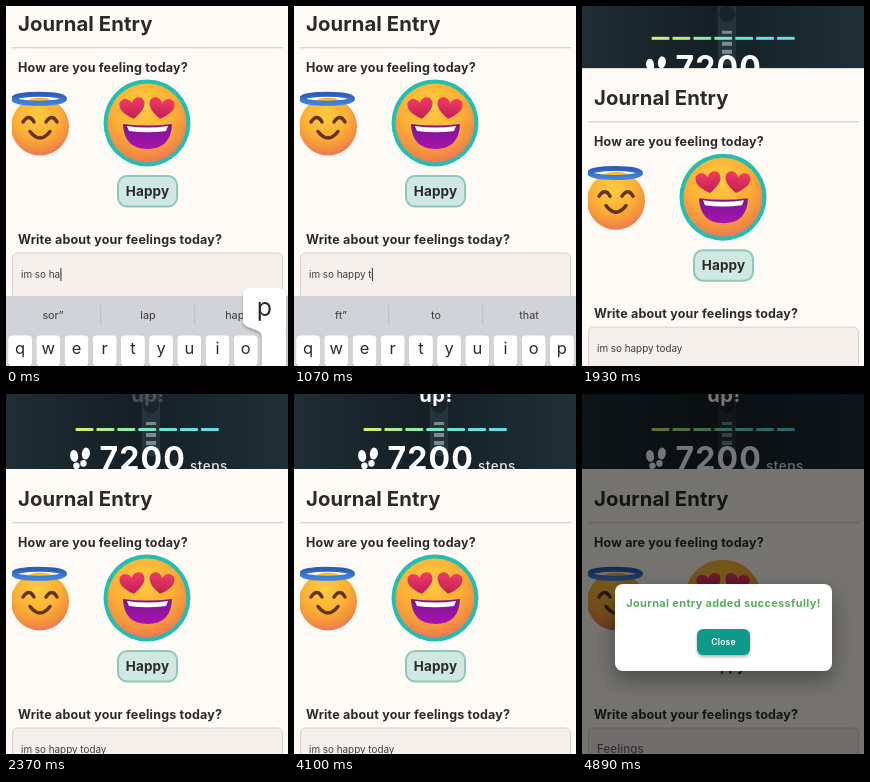
Write an HTML page that moves like this. It is 282x360 px and loops after 4960 ms.

```html
<!DOCTYPE html>
<html lang="en">
<head>
<meta charset="utf-8">
<title>Journal entry</title>
<style>
  html, body { margin: 0; width: 100%; height: 100%; overflow: hidden; background: #fefbf6; }
  svg { display: block; width: 282px; height: 360px; font-family: Inter, sans-serif; fill: #2b2a2b; }
  text { white-space: pre; }
  .mid { text-anchor: middle; }
  .head { font-weight: 700; font-size: 12.5px; letter-spacing: .18px; }
  #page, #hero, #keyboard, #cheer, #shade, #dialog { animation: 4960ms linear infinite; }
  #page { animation-name: scroll; }
  #hero { animation-name: parallax; }
  #keyboard { animation-name: slide; }
  #cheer { animation-name: cheer; }
  #shade, #dialog { animation-name: appear; }

  /* 1730 to 2160 ms */
  @keyframes scroll {
    0%, 34.88% { transform: translateY(0); animation-timing-function: cubic-bezier(.215, .61, .355, 1); }
    43.55%, 100% { transform: translateY(87px); }
  }
  @keyframes parallax {
    0%, 34.88% { transform: translateY(-22px); animation-timing-function: cubic-bezier(.215, .61, .355, 1); }
    43.55%, 100% { transform: translateY(0); }
  }
  /* 1730 to 1910 ms */
  @keyframes slide {
    0%, 34.88% { transform: translateY(0); animation-timing-function: ease; }
    38.51%, 100% { transform: translateY(110px); }
  }
  @keyframes cheer {
    0%, 40% { opacity: 0; }
    62% { opacity: .6; }
    82%, 100% { opacity: 1; }
  }
  /* 4560 to 4760 ms */
  @keyframes appear {
    0%, 91.94% { opacity: 0; animation-timing-function: ease-out; }
    95.97%, 100% { opacity: 1; }
  }

  #love { transform-origin: 141px 117px; }
  .sent #love { transform: scale(.97); }
  .sent .picked, #hint { display: none; }
  .sent #hint { display: inline; }
</style>
</head>
<body>
<svg id="stage" viewBox="0 0 282 360">
  <defs>
    <linearGradient id="night">
      <stop offset="0" stop-color="#1f2d34"/>
      <stop offset=".45" stop-color="#152026"/>
      <stop offset=".6" stop-color="#17242b"/>
      <stop offset="1" stop-color="#1f2f37"/>
    </linearGradient>
    <linearGradient id="progress" gradientUnits="userSpaceOnUse" x1="69" x2="213">
      <stop offset="0" stop-color="#e2ee62"/>
      <stop offset=".35" stop-color="#90eda4"/>
      <stop offset=".6" stop-color="#66e6d2"/>
      <stop offset="1" stop-color="#64daf0"/>
    </linearGradient>
    <radialGradient id="skin" cx=".45" cy=".3" r=".72">
      <stop offset="0" stop-color="#ffcc40"/>
      <stop offset=".55" stop-color="#fbaf35"/>
      <stop offset=".85" stop-color="#f28c42"/>
      <stop offset="1" stop-color="#ea7360"/>
    </radialGradient>
    <linearGradient id="rose" x2="0" y2="1">
      <stop offset="0" stop-color="#ee3d62"/>
      <stop offset="1" stop-color="#c41c5a"/>
    </linearGradient>
    <linearGradient id="plum" x2="0" y2="1">
      <stop offset="0" stop-color="#7a1590"/>
      <stop offset="1" stop-color="#a814b0"/>
    </linearGradient>
    <linearGradient id="halo" x2="0" y2="1">
      <stop offset="0" stop-color="#2a5fb8"/>
      <stop offset="1" stop-color="#3f82dc"/>
    </linearGradient>
    <clipPath id="edge"><rect x="6" y="70" width="270" height="100"/></clipPath>
    <path id="heart" d="M0 11C-8 6-13 1-12.500-4.500C-12-11-3-12 0-5C3-12 12-11 12.500-4.500C13 1 8 6 0 11Z"/>
    <filter id="soft" x="-30%" y="-30%" width="160%" height="180%">
      <feDropShadow dx="0" dy="2" stdDeviation="1.500" flood-opacity=".3"/>
    </filter>
    <filter id="lift" x="-20%" y="-40%" width="140%" height="210%">
      <feDropShadow dx="0" dy="9" stdDeviation="10" flood-opacity=".35"/>
    </filter>
  </defs>

  <g id="hero">
    <rect y="-30" width="282" height="140" fill="url(#night)"/>
    <rect x="136" y="-20" width="18" height="82" rx="4" fill="#25333a"/>
    <circle cx="145" cy="11" r="8" fill="#18242a"/>
    <path d="M140 28h10v3h-10zM140 39h10v4h-10zM140 47h10v4h-10z" fill="#7d8b90"/>
    <text id="cheer" class="mid" x="142" y="7.500" font-size="20" font-weight="700" letter-spacing=".5" fill="#fff">up!</text>
    <g id="dashes" fill="url(#progress)"></g>
    <g fill="#fff">
      <g transform="rotate(-8 68 65)">
        <ellipse cx="68.500" cy="62" rx="4" ry="6"/><ellipse cx="69.500" cy="72" rx="3.200" ry="3.300"/>
      </g>
      <g transform="rotate(8 79 62)">
        <ellipse cx="79.500" cy="59.500" rx="4" ry="6"/><ellipse cx="78.500" cy="69.500" rx="3.200" ry="3.300"/>
      </g>
      <text x="93.500" y="76" font-size="32" font-weight="700" letter-spacing="1.100">7200</text>
      <text x="184" y="76.500" font-size="13.500" font-weight="500" letter-spacing=".5" fill="#e4e7e8">steps</text>
    </g>
  </g>

  <g id="page">
    <rect y="-12" width="282" height="380" fill="#fefbf6"/>
    <text x="12" y="25" font-size="20.300" font-weight="700" letter-spacing=".1">Journal Entry</text>
    <rect x="6" y="41" width="271" height="1.300" fill="#d6d3d1"/>
    <text class="head" x="12" y="66">How are you feeling today?</text>

    <g id="angel" clip-path="url(#edge)">
      <circle cx="34" cy="120.500" r="29" fill="url(#skin)"/>
      <ellipse cx="33" cy="92.800" rx="25.500" ry="4.500" fill="none" stroke="url(#halo)" stroke-width="5"/>
      <g fill="none" stroke="#63331f" stroke-width="3.500" stroke-linecap="round">
        <path d="M17 116q6-9 11 0M40 116q6-9 11 0M24 125.500q10 13 20 0"/>
      </g>
    </g>

    <g id="love">
      <circle class="picked" cx="141" cy="117" r="43.500" fill="#22beb2"/>
      <circle cx="141" cy="117" r="39.500" fill="url(#skin)"/>
      <use href="#heart" x="126.500" y="102" fill="url(#rose)" transform="rotate(-8 126 102)"/>
      <use href="#heart" x="155.500" y="102" fill="url(#rose)" transform="rotate(8 156 102)"/>
      <path d="M117 118Q141 121 166 118Q165 143 141.500 143T117 118Z" fill="url(#plum)"/>
      <path d="M121 120Q141 123 162 120L160 125Q141 127.500 123 125Z" fill="#fff"/>
    </g>

    <rect class="picked" x="112" y="170" width="59" height="30.500" rx="9" fill="#cfe8e1" stroke="#8fc7bd" stroke-width="2"/>
    <text class="mid" x="141.500" y="190" font-size="13.500" font-weight="700" letter-spacing=".1">Happy</text>

    <text class="head" x="12" y="238">Write about your feelings today?</text>
    <rect x="6.500" y="247" width="270" height="150" rx="5" fill="#f5f0ec" stroke="#d9d1ce"/>
    <text id="entry" x="15" y="271.700" font-size="9.900" fill="#3d3b3b"></text>
    <rect id="caret" y="262" width="1" height="13"/>
    <text id="hint" x="15" y="272" font-size="11.500" font-weight="500" letter-spacing=".1" fill="#6b6866">Feelings</text>
  </g>

  <g id="keyboard">
    <rect y="290" width="282" height="120" fill="#d1d3d9"/>
    <path d="M94.500 299v20M188.500 299v20" stroke="#bfc1c8"/>
    <g id="words" class="mid" font-size="10.800" fill="#3a3b3f"></g>
    <g id="keys" class="mid" font-size="16.500"></g>
    <g id="bubble" filter="url(#soft)">
      <path fill="#fff"/>
      <text class="mid" font-size="25"></text>
    </g>
  </g>

  <rect id="shade" width="282" height="360" opacity="0" fill="rgba(0,0,0,.54)"/>
  <g id="dialog" opacity="0">
    <rect x="33" y="190" width="217" height="87" rx="8" fill="#fff" filter="url(#lift)"/>
    <text class="mid" x="141.500" y="213" font-size="11" font-weight="700" letter-spacing=".33" fill="#54ae5a">Journal entry added successfully!</text>
    <rect x="115" y="235" width="53" height="26" rx="6" fill="#119a8a" filter="url(#soft)"/>
    <text class="mid" x="141.500" y="251.200" font-size="8.500" font-weight="600" letter-spacing=".2" fill="#fff">Close</text>
  </g>
</svg>
<script>
  const LOOP = 4960, BLUR = 1730, SENT = 4560, PITCH = 28.2;
  const $ = id => document.getElementById(id);

  function add(parent, tag, attrs, text = '') {
    const el = document.createElementNS('http://www.w3.org/2000/svg', tag);
    for (const name in attrs) el.setAttribute(name, attrs[name]);
    el.textContent = text;
    return parent.appendChild(el);
  }

  for (let i = 0; i < 7; i++) {
    add($('dashes'), 'rect', { x: 69.5 + i * 20.9, y: 34, width: 18, height: 3, rx: 1 });
  }

  const ROWS = ['qwertyuiop', 'asdfghjkl'];
  [...ROWS[0]].forEach((letter, i) => {
    const x = 14.1 + i * PITCH;
    add($('keys'), 'rect', { x: x - 12, y: 330.5, width: 24, height: 31, rx: 4, fill: '#8b8d92' });
    add($('keys'), 'rect', { x: x - 12, y: 329.5, width: 24, height: 31, rx: 4, fill: '#fff' });
    add($('keys'), 'text', { x, y: 348 }, letter);
  });

  const words = [47, 142, 235].map(x => add($('words'), 'text', { x, y: 313 }));

  // Each press: letter, touch down, release
  const presses = [
    ['p', 0, 100], ['p', 240, 340], ['y', 500, 600], [' ', 720, 790], ['t', 890, 990],
    ['o', 1150, 1240], ['d', 1270, 1350], ['a', 1370, 1450], ['y', 1470, 1570]
  ];
  const guesses = [
    [0, 'sor”', 'lap', 'happy'],
    [100, '“hap”', 'happy', 'happen'],
    [600, '“happy”', 'happy', 'happily'],
    [790, 'to', 'that', 'for'],
    [990, 'ft”', 'to', 'that'],
    [1240, '“to”', 'today', 'too'],
    [1350, '“tod”', 'today', 'today’s'],
    [1570, '“today”', 'today’s', 'todays']
  ];

  const [shape, glyph] = $('bubble').children;

  function showBubble(letter) {
    const row = ROWS.findIndex(keys => keys.includes(letter));
    $('bubble').style.display = row < 0 ? 'none' : '';
    if (row < 0) return;
    const x = 14.1 * (row + 1) + ROWS[row].indexOf(letter) * PITCH;
    const top = 282 + row * 40.6;
    const right = Math.min(x + 21.5, 280), left = right - 43;
    const a = x - 12, b = x + 12;
    const neck = top + 33, key = top + 48;
    shape.setAttribute('d', `M${left + 8} ${top}H${right - 8}Q${right} ${top} ${right} ${top + 8}V${neck}
      C${right} ${neck + 8} ${b} ${key - 8} ${b} ${key}V${top + 79}H${a}V${key}
      C${a} ${key - 8} ${left} ${neck + 8} ${left} ${neck}V${top + 8}Q${left} ${top} ${left + 8} ${top}Z`);
    glyph.setAttribute('x', (left + right) / 2);
    glyph.setAttribute('y', top + 28);
    glyph.textContent = letter;
  }

  function render(t) {
    const sent = t >= SENT;
    const typed = presses.filter(p => t >= p[2]).map(p => p[0]).join('');
    $('entry').textContent = sent ? '' : 'im so ha' + typed;
    $('caret').style.display = t < BLUR ? '' : 'none';
    if (t < BLUR) $('caret').setAttribute('x', 15.3 + $('entry').getComputedTextLength());
    const held = presses.find(p => t >= p[1] && t < p[2]);
    showBubble(held ? held[0] : '-');
    const guess = guesses.filter(g => t >= g[0]).pop();
    words.forEach((word, i) => word.textContent = guess[i + 1]);
    $('stage').classList.toggle('sent', sent);
  }

  // Typing shares the clock of the CSS scroll
  const clock = $('page').getAnimations()[0];
  function tick() {
    render((clock.currentTime || 0) % LOOP);
    requestAnimationFrame(tick);
  }
  tick();
</script>
</body>
</html>
```
